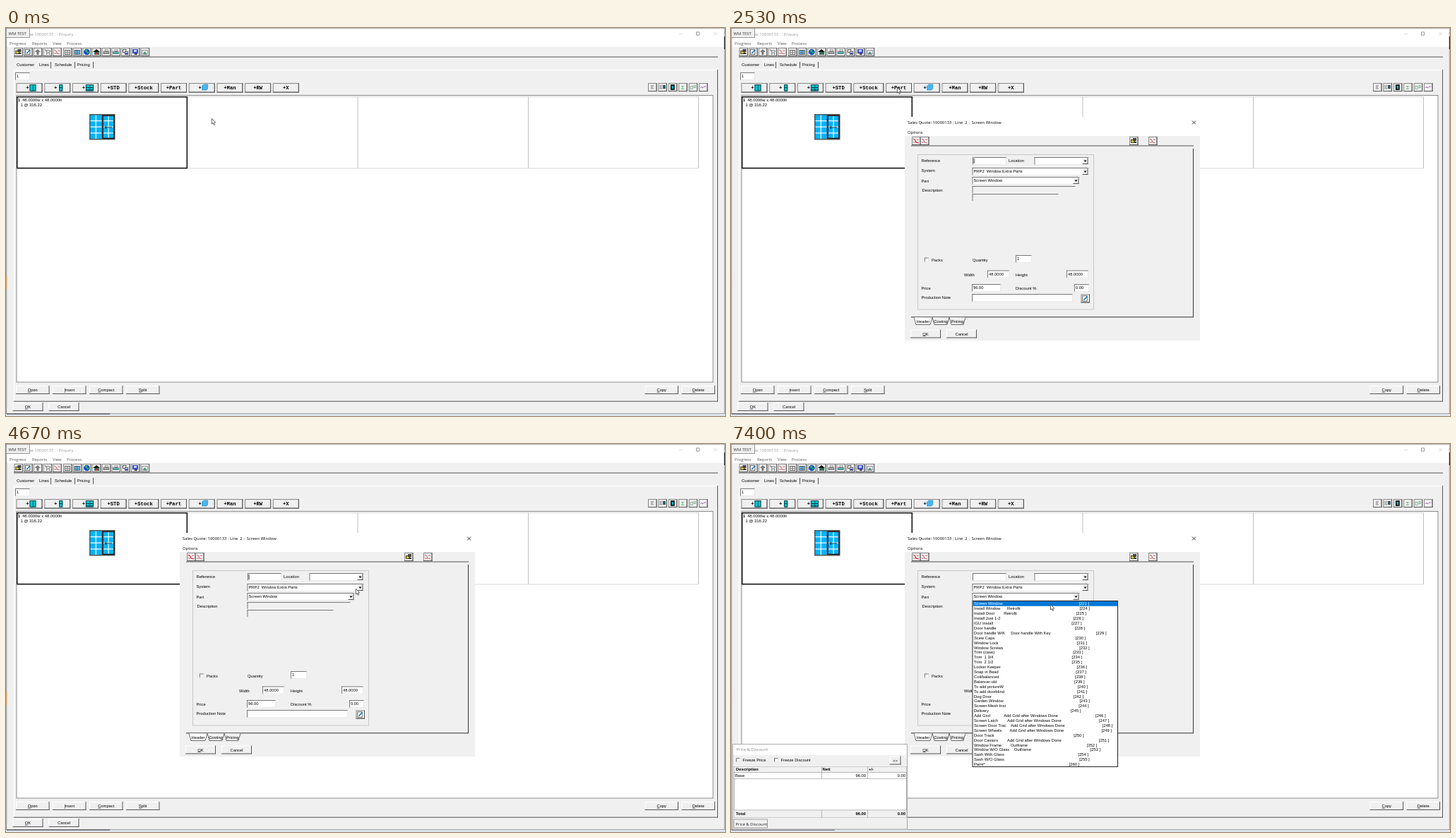
These frames come from a looping animation (1018x550 px, 8000 ms). An HTML page with a canvas:

```html
<!DOCTYPE html>
<html lang="en">
<head>
<meta charset="utf-8">
<title>Quote lines</title>
<style>
html, body { margin: 0; height: 100%; overflow: hidden; background: #f0f0f0; }
canvas { display: block; }
</style>
</head>
<body>
<canvas id="stage" width="1018" height="550"></canvas>
<script>
const ctx = document.getElementById('stage').getContext('2d');
const SANS = '"Liberation Sans", Arial, sans-serif';
const UI = '"Open Sans", sans-serif';
const MONO = '"Liberation Mono", monospace';
const FACE = '#f0f0f0', DARK = '#555', MID = '#a0a0a0', CYAN = '#00c8d2', BLUE = '#00b4ff';

// ---------- primitives ----------
function box(x, y, w, h, color) {
  ctx.fillStyle = color;
  ctx.fillRect(x, y, w, h);
}
function frame(x, y, w, h, color, width = 1) {
  ctx.strokeStyle = color;
  ctx.lineWidth = width;
  ctx.strokeRect(x + width / 2, y + width / 2, w - width, h - width);
}
function path(points, fill, stroke, width = 0.7) {
  ctx.beginPath();
  points.forEach(([x, y], i) => i ? ctx.lineTo(x, y) : ctx.moveTo(x, y));
  if (fill) { ctx.closePath(); ctx.fillStyle = fill; ctx.fill(); }
  if (stroke) { ctx.strokeStyle = stroke; ctx.lineWidth = width; ctx.stroke(); }
}
function disc(x, y, r, color) {
  ctx.fillStyle = color;
  ctx.beginPath();
  ctx.arc(x, y, r, 0, 7);
  ctx.fill();
}
function text(s, x, y, { size = 5.8, font = SANS, color = '#000', align = 'left', bold = false } = {}) {
  ctx.font = `${bold ? 'bold ' : ''}${size}px ${font}`;
  ctx.fillStyle = color;
  ctx.textAlign = align;
  ctx.fillText(s, x, y);
}
const uiText = (s, x, y, color = '#222') => text(s, x, y, { font: UI, size: 5.85, color });

// ---------- controls ----------
function raised(x, y, w, h, outline) {
  box(x, y, w, h, FACE);
  if (outline) frame(x, y, w, h, outline);
  else box(x, y, w, 1, '#fff'), box(x, y, 1, h, '#fff');
  box(x, y + h - 1, w, 1, DARK);
  box(x + w - 1, y, 1, h, DARK);
}
function button(label, x, y, w, h = 12, underline = true) {
  raised(x, y, w, h);
  const mid = x + w / 2, base = y + h / 2 + 2;
  text(label, mid, base, { align: 'center' });
  if (underline) {
    const left = mid - ctx.measureText(label).width / 2;
    box(left, base + 0.8, ctx.measureText(label[0]).width, 0.6, '#000');
  }
}
function field(value, x, y, w, h = 11, fill = '#fff') {
  box(x, y, w, h, fill);
  box(x, y, w, 1, '#777');
  box(x, y, 1, h, '#777');
  if (fill === '#fff') box(x, y + h - 1, w, 0.6, '#ddd'), box(x + w - 1, y, 0.6, h, '#ddd');
  text(value, x + 2, y + 7.3);
}
function combo(value, x, y, w, pressed) {
  field(value, x, y, w);
  const bx = x + w - 9;
  if (pressed) { box(bx, y + 1, 8, 9, FACE); frame(bx, y + 1, 8, 9, MID); }
  else raised(bx, y + 1, 8, 9);
  path([[bx + 2, y + 4.5], [bx + 6, y + 4.5], [bx + 4, y + 7]], '#000');
}
function checkbox(label, x, y, gap) {
  field('', x, y, 6, 6);
  text(label, x + gap, y + 5.2);
}

// Small toolbar pictures inside a raised 12px button
const glyphs = {
  folder(x, y) {
    box(x + 2, y + 4, 6, 5, '#d8c840'); frame(x + 2, y + 4, 6, 5, '#222', 0.8);
    box(x + 5, y + 2, 5, 4, '#444'); box(x + 6, y + 7, 4, 2, '#333');
  },
  pen(x, y) {
    box(x + 2, y + 2, 7, 8, '#fff'); frame(x + 2, y + 2, 7, 8, '#333', 0.7);
    path([[x + 4, y + 8], [x + 9, y + 3]], null, '#1878b8', 1.7);
  },
  up(x, y) {
    path([[x + 6, y + 2], [x + 10, y + 6], [x + 2, y + 6]], '#777');
    box(x + 4.5, y + 6, 3, 4, '#777');
  },
  cart(x, y) {
    path([[x + 2, y + 3], [x + 4, y + 3], [x + 5, y + 7], [x + 9, y + 7], [x + 10, y + 4], [x + 4, y + 4]], null, '#777', 1);
    disc(x + 5, y + 9, 1, '#777'); disc(x + 9, y + 9, 1, '#777');
  },
  chart(x, y, c = '#d06a70') {
    path([[x + 2, y + 3], [x + 5, y + 5], [x + 6, y + 8], [x + 10, y + 9]], null, c, 1.1);
    box(x + 2, y + 7, 3, 2, '#dca5a8'); box(x + 7, y + 3, 3, 2, '#dca5a8');
  },
  grid(x, y, c = '#ddd') {
    box(x + 2, y + 3, 8, 7, c); frame(x + 2, y + 3, 8, 7, '#555', 0.8);
    box(x + 5.6, y + 3, 0.8, 7, '#555'); box(x + 2, y + 6, 8, 0.7, '#888');
  },
  globe(x, y) {
    disc(x + 6, y + 6, 4.3, '#0b4fd0');
    box(x + 4, y + 3, 3, 3, '#30b050'); box(x + 6, y + 6, 3, 2, '#30b050');
  },
  house(x, y) {
    path([[x + 1, y + 6], [x + 6, y + 2], [x + 11, y + 6]], '#111');
    box(x + 3, y + 6, 7, 4, '#187868'); box(x + 5, y + 7, 2, 3, '#e03030');
  },
  printer(x, y, c = '#aaa') {
    box(x + 4, y + 2, 5, 3, '#fff'); frame(x + 4, y + 2, 5, 3, '#777', 0.7);
    box(x + 2, y + 5, 8, 4, c); frame(x + 2, y + 5, 8, 4, '#666', 0.8);
  },
  pages(x, y) {
    for (const d of [0, 3]) {
      box(x + 2 + d, y + 2 + d, 5, 5, '#fff');
      frame(x + 2 + d, y + 2 + d, 5, 5, '#334', 0.8);
    }
    box(x + 6, y + 7, 3, 2, '#3858c0');
  },
  screen(x, y) {
    box(x + 2, y + 2, 8, 6, '#3848c8'); box(x + 4, y + 3, 4, 3, '#c8d0ff');
    box(x + 5, y + 8, 4, 2, '#444');
  },
  picture(x, y) {
    frame(x + 2, y + 3, 8, 7, '#779', 0.8);
    path([[x + 3, y + 9], [x + 6, y + 5], [x + 9, y + 9]], '#48a070');
  },
  list(x, y) {
    for (let i = 0; i < 3; i++) box(x + 4, y + 3.5 + i * 2, 4 - i % 2, 0.7, '#444');
  },
  door(x, y) { box(x + 3, y + 2, 6, 8, '#222'); box(x + 5, y + 4, 2, 4, CYAN); },
  mixed(x, y) { glyphs.list(x - 2, y); box(x + 7, y + 3, 3, 5, '#167e90'); frame(x + 7, y + 3, 3, 5, '#222', 0.7); },
  sum(x, y) { text('Σ', x + 6, y + 8.5, { size: 8, color: '#40a050', align: 'center' }); },
  pair(x, y) { frame(x + 2, y + 4, 4, 5, '#70a888', 0.8); frame(x + 7, y + 3, 3, 4, '#70a888', 0.8); },
  wave(x, y) { path([[x + 2, y + 7], [x + 4, y + 5], [x + 5, y + 7], [x + 8, y + 5], [x + 10, y + 5]], null, '#a860b0', 0.9); }
};
function tool(name, x, y, ...rest) {
  raised(x, y, 12.5, 12, '#888');
  glyphs[name](x, y, ...rest);
}

// ---------- main window ----------
const mainTools = ['folder', 'pen', 'up', 'cart', 'chart', 'grid', ['grid', '#58b0e8'], 'globe', 'house',
  'printer', ['printer', '#50b8b8'], 'pages', 'screen', 'picture'];
const addButtons = ['', '', '', 'STD', 'Stock', 'Part', '', 'Man', 'RW', 'X'];

function productWindow(x, y) {
  box(x, y, 36.5, 36.5, '#555');
  box(x + 1.5, y + 1.5, 16, 33.5, BLUE);
  frame(x + 18.5, y + 1.5, 17, 33.5, '#111');
  box(x + 20, y + 3, 14, 30.5, BLUE);
  for (const dy of [9, 17.6, 26.3]) {
    box(x + 1.5, y + dy, 16, 1.2, '#fff');
    box(x + 20, y + dy, 14, 1.2, '#fff');
  }
  box(x + 8.7, y + 1.5, 1.2, 33.5, '#fff');
  box(x + 26.5, y + 3, 1.2, 30.5, '#fff');
  box(x + 21, y + 18.5, 11, 0.8, '#012');
  box(x + 23, y + 17, 0.8, 4, '#012');
}

function addBar(focused) {
  addButtons.forEach((name, i) => {
    const x = 14.5 + i * 39.7 + (i > 4 ? 6 : 0), w = i === 4 ? 43 : 37;
    raised(x, 78, w, 13.5, '#888');
    if (i === 5 && focused) frame(x, 78, w, 13.5, '#000', 1.5);
    const icon = !name;
    text('+' + name, icon ? x + 16 : x + w / 2, 87,
      { font: MONO, size: 7.2, bold: true, align: 'center' });
    if (!icon) return;
    const px = x + (i === 1 ? 21 : 19);
    if (i === 6) {
      path([[px, 82], [px + 2, 80], [px + 8, 80], [px + 8, 86], [px + 6, 88], [px, 88]], '#48b8f0', '#2888c0');
      return;
    }
    const pw = [9, 5, 11][i];
    box(px, 80, pw, 9.5, CYAN);
    frame(px, 80, pw, 9.5, '#134', 0.9);
    if (i !== 1) box(px + pw / 2, 80, 0.8, 9.5, '#134');
    if (i) box(px, 84, pw, 0.9, '#134');
    if (i === 2) box(px, 87, pw, 0.8, '#134');
  });
}

function mainWindow(active, focused) {
  box(0, 0, 1018, 550, FACE);
  box(0, 0, 1018, 27, '#fff');
  box(0, 0, 1018, 0.8, '#999');
  box(0, 14, 1.2, 536, '#999');
  box(0, 352, 1.2, 18, '#d89a50');
  box(1016.8, 0, 1.2, 550, '#aaa');
  box(1016.8, 12, 1.2, 18, '#223');
  box(0, 546, 1018, 1, MID);
  box(0, 547, 1018, 3, '#dfe5ee');
  box(1, 546.5, 146, 1.2, '#555');

  uiText('te 10000133 : : Enquiry', 33.5, 10.5, active ? '#000' : '#999');
  box(0, 0, 34, 14, FACE);
  frame(0, 0, 34, 14, '#999');
  uiText('WM TEST', 3.5, 9.7, '#333');
  const chrome = active ? '#222' : '#ccc';
  box(953, 8, 5, 0.7, chrome);
  frame(977, 5.5, 5, 5, active ? '#222' : '#777', 0.7);
  path([[1002, 5.5], [1007, 10.5]], null, chrome);
  path([[1007, 5.5], [1002, 10.5]], null, chrome);
  [['Progress', 5], ['Reports', 37], ['View', 66], ['Process', 86]]
    .forEach(([s, x]) => uiText(s, x, 24, active ? '#000' : '#555'));

  mainTools.forEach((t, i) => {
    const [name, ...rest] = [].concat(t);
    tool(name, 11.5 + i * 13.7 + (i > 4 ? 1 : 0), 28, ...rest);
  });
  box(11, 40.5, 997, 1, DARK);

  // Tab strip and page
  box(11, 59, 996, 1, '#fff');
  box(11, 59, 1, 470, '#fff');
  box(1007, 59, 1, 470.5, DARK);
  box(11, 528.7, 997, 1, DARK);
  [['Customer', 15], ['Lines', 47], ['Schedule', 69], ['Pricing', 101]].forEach(([s, x]) => text(s, x, 54));
  box(44, 46, 19, 0.8, '#fff');
  for (const x of [63, 97, 123]) box(x, 48, 1, 9, DARK);

  field('1', 13, 63, 21);
  addBar(focused);
  ['list', 'mixed', 'door', 'sum', 'pair', 'wave'].forEach((n, i) => tool(n, 909 + i * 14.4, 78));

  // Line grid
  box(14.5, 95, 987, 407.5, '#fff');
  frame(14.5, 95, 987, 407.5, '#888');
  box(15, 97, 965, 0.8, '#ccc');
  box(15, 198.6, 965, 0.8, '#ccc');
  for (const x of [497.5, 739, 980]) box(x, 97, 1, 102, '#c0c0c0');
  frame(15, 97, 242, 102.3, '#000', 1.4);
  text('1', 17, 103.5, { bold: true });
  text('48.0000w x 48.0000h', 23, 103.5, { size: 5.9 });
  text('1 @ 316.22', 20.5, 111, { size: 5.9 });
  productWindow(118, 122);

  ['Open', 'Insert', 'Compact', 'Split'].forEach((s, i) => button(s, 14 + i * 52, 507, 47.5));
  button('Copy', 904.5, 507, 47.5);
  button('Delete', 956.5, 507, 47.5);
  button('OK', 9.5, 531, 43);
  button('Cancel', 60.5, 531, 43, 12, false);
}

// ---------- part dialog ----------
function dialog(caret, listOpen, pressed) {
  box(246, 126, 418, 317, FACE);
  box(246, 126, 418, 27, '#fff');
  uiText('Sales Quote: 10000133 : Line  2 :  Screen Window', 250, 136.2, '#000');
  path([[653, 131.5], [658, 136.5]], null, '#111', 0.8);
  path([[658, 131.5], [653, 136.5]], null, '#111', 0.8);
  uiText('Options', 250, 149.8, '#000');
  tool('chart', 256, 154, '#c02028');
  tool('chart', 268, 154);
  tool('folder', 564, 154);
  tool('chart', 591, 154);
  box(255, 166.5, 400, 1, DARK);
  box(654, 171, 1, 239, '#333');
  box(255, 409.3, 400, 1, '#333');
  frame(264, 179, 250, 220.5, '#c8c8c8');

  [['Reference', 269.5, 189.5], ['Location', 393, 189.5], ['System', 269.5, 204], ['Part', 269.5, 218.5],
    ['Description', 270.5, 232], ['Quantity', 342, 331], ['Width', 330, 352], ['Height', 403, 352],
    ['Price', 269.5, 371], ['Discount %', 403, 371], ['Production Note', 269.5, 384]]
    .forEach(label => text(...label));
  field('', 342, 183, 48);
  if (caret) box(343.7, 185, 0.8, 7, '#000');
  combo('', 429.5, 183, 77);
  combo('PRP2  Window Extra Parts', 341.5, 198, 165);
  combo('Screen Window', 341.5, 211, 152, pressed);
  field('', 341.5, 224, 146, 10, FACE);
  field('', 341.5, 235, 122, 10, FACE);
  checkbox('Packs', 274, 325.5, 10);
  field('1', 403, 322, 23);
  field('48.0000', 363, 343.5, 31);
  field('48.0000', 475, 343.5, 31);
  field('96.00', 341, 363, 41);
  field('0.00', 486, 363, 21);
  field('', 341, 377, 143);
  tool('pen', 495.5, 377.5);

  [['Header', 259, 26], ['Costing', 285, 24], ['Pricing', 309, 23]].forEach(([s, x, w], i) => {
    const tab = [[x, 410], [x + 3, 420.5], [x + w - 3, 420.5], [x + w, 410.5]];
    path(tab, i ? FACE : '#fff');
    path(tab, null, '#333');
    text(s, x + w / 2, 417.5, { align: 'center' });
  });
  button('OK', 254, 427.5, 43);
  button('Cancel', 305, 427.5, 43, 12, false);
  if (listOpen) partList();
}

const RETROFIT = 'Retrofit', GRID = 'Add Grid after Windows Done', OUT = 'Outframe';
const parts = [['Screen Window'], ['Install Window', RETROFIT], ['Install Door', RETROFIT], ['Install Just 1-2'],
  ['IGU Install'], ['Door handle'], ['Door handle W/K', 'Door handle With Key'], ['Scew Caps'], ['Window Lock'],
  ['Window Screws'], ['Trim (case)'], ['Trim  1 3/4'], ['Trim  2 1/2'], ['Locker Keeper'], ['Snap in Bead'],
  ['Coil/balanced'], ['Balancer-old'], ['To add pictureW'], ['To add doorblind'], ['Dog Door'], ['Garden Window'],
  ['Screen Mesh Inst'], ['Delivery'], ['Add Grid', GRID], ['Screen Latch', GRID], ['Screen Door Trac', GRID],
  ['Screen Wheels', GRID], ['Door Track'], ['Door Castors', GRID], ['Window Frame', OUT], ['Window W/O Glass', OUT],
  ['Sash With Glass'], ['Sash W/O Glass'], ['Paint*']];

function partList() {
  box(341.5, 222, 206.5, 236, '#fff');
  frame(341.5, 222, 206.5, 236, '#222');
  box(342.5, 223, 204.5, 6.8, '#0078d7');
  parts.forEach(([name, note = ''], i) => {
    const code = i === 0 ? 221 : i === parts.length - 1 ? 260 : 223 + i;
    text(`${name.padEnd(20)}${note.padEnd(60)}[${code} ]`, 344, 228.4 + i * 6.9, { color: i ? '#000' : '#fff' });
  });
}

// ---------- price pane ----------
function pricePane() {
  box(2, 425, 248, 121.5, FACE);
  box(2, 425, 248, 16, '#fff');
  frame(2, 425, 248, 121.5, '#aaa');
  uiText('Price & Discount', 7.5, 435.2, '#888');
  checkbox('Freeze Price', 7, 445, 9.5);
  checkbox('Freeze Discount', 61, 445, 9.5);
  button('>>', 224.5, 442.5, 16, 12, false);
  box(4, 457, 245, 73, '#fff');
  frame(4, 457, 245, 73, '#999', 0.8);
  box(4.5, 457.5, 244, 8, FACE);
  box(4.5, 519, 244, 10.5, FACE);
  for (const y of [465, 474, 518.5]) box(4, y, 245, 0.8, '#aaa');
  for (const x of [128, 193]) {
    box(x, 457, 0.8, 17, '#aaa');
    box(x, 519, 0.8, 11, '#aaa');
  }
  const bold = { bold: true };
  text('Description', 7, 463, bold);
  text('Nett', 129.5, 463, bold);
  text('+/-', 195, 463, bold);
  text('Base', 6, 472);
  text('Total', 7, 526.3, bold);
  [[472, false], [526.3, true]].forEach(([y, heavy]) => {
    text('96.00', 191, y, { align: 'right', bold: heavy });
    text('0.00', 247, y, { align: 'right', bold: heavy });
  });
  frame(3.5, 531.5, 48.5, 13, MID);
  uiText('Price & Discount', 6.5, 540.5);
}

// ---------- pointer ----------
// [tick, x, y], 15 ticks per second
const route = [[0, 291, 128], [3, 281, 120], [9, 243, 90], [13, 235, 84], [41, 235, 84], [44, 255, 96], [47, 310, 130],
  [50, 355, 166], [54, 357, 203], [58, 385, 209], [62, 450, 212], [65, 485, 207], [67, 496, 203], [69, 495, 203],
  [70, 495, 205], [74, 490, 211], [77, 487.5, 213], [104, 487.5, 213], [107, 474, 219], [111, 452, 227], [120, 452, 227]];

function pointerAt(tick) {
  const i = route.findIndex(k => k[0] > tick);
  const [t0, x0, y0] = route[i - 1], [t1, x1, y1] = route[i];
  const p = (tick - t0) / (t1 - t0);
  return [x0 + (x1 - x0) * p, y0 + (y1 - y0) * p];
}
function arrow(x, y) {
  const shape = [[0, 0], [0, 7.6], [1.7, 6.2], [3, 9], [4.2, 8.4], [3, 5.8], [5.3, 5.5], [0, 0]];
  path(shape.map(([dx, dy]) => [x + 0.4 + dx, y + 0.4 + dy]), '#fff', '#333', 0.75);
}
function spinner(x, y, tick) {
  disc(x, y, 4.6, '#8cc8f0');
  disc(x, y, 2.2, FACE);
  ctx.lineWidth = 1.8;
  ctx.strokeStyle = '#1a78c8';
  ctx.beginPath();
  ctx.arc(x, y, 3.4, tick * 0.5, tick * 0.5 + 5);
  ctx.stroke();
}

function draw(now) {
  const tick = Math.floor((now % 8000 + 5) * 15 / 1000) % 120;
  const dialogOpen = tick >= 36;
  const pressed = tick >= 26 && !dialogOpen;
  mainWindow(pressed, pressed);
  if (dialogOpen) dialog(tick < 84, tick >= 85, tick >= 84 && tick < 105);
  if (tick >= 84) pricePane();
  if (tick >= 28 && tick < 37) spinner(233.5, 83, tick);
  else arrow(...pointerAt(tick));
  requestAnimationFrame(() => draw(performance.now() - start));
}
const start = performance.now();
draw(0);
</script>
</body>
</html>
```
